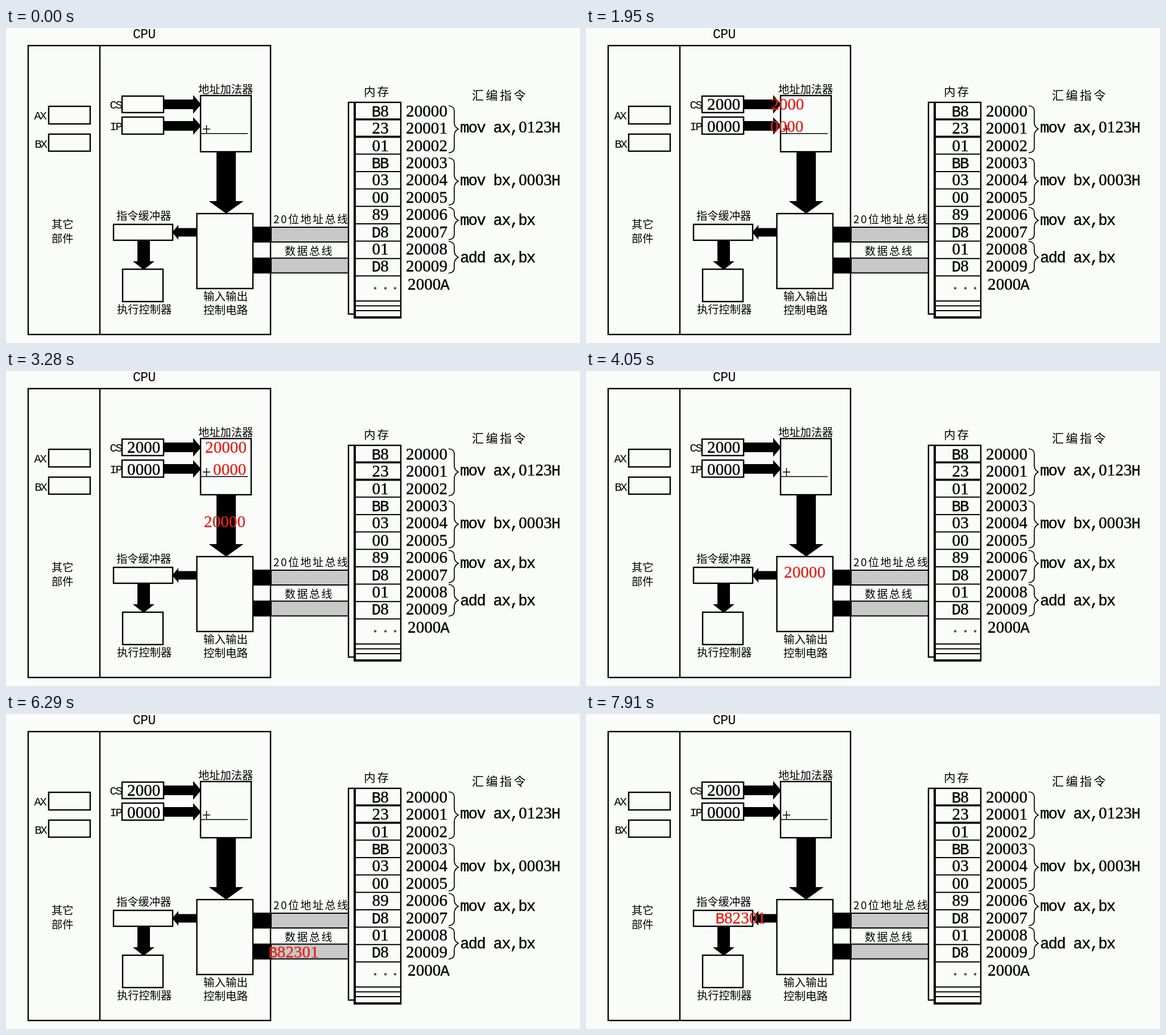
These frames come from a looping animation (1009x555 px, 7.99 s). An HTML page with a canvas:

```html
<!DOCTYPE html>
<html lang="zh">
<head>
<meta charset="utf-8">
<style>
html, body { margin: 0; width: 100%; height: 100%; overflow: hidden; background: #f9fcf9; }
canvas { display: block; }
</style>
</head>
<body>
<canvas id="stage" width="1009" height="555"></canvas>
<script>
const c = document.getElementById('stage').getContext('2d');
const LOOP = 7990, START = 1490, STEP = 77.33;
const PAPER = '#f9fcf9', INK = '#000', RED = '#e6231c', GREY = '#c8c8c8';
const CELL = 14.6;

function box(x1, y1, x2, y2, width = 2.4, fill) {
  if (fill) {
    c.fillStyle = fill;
    c.fillRect(x1, y1, x2 - x1, y2 - y1);
  }
  c.strokeStyle = INK;
  c.lineWidth = width;
  c.strokeRect(x1, y1, x2 - x1, y2 - y1);
}

function line(x1, y1, x2, y2, width = 2) {
  c.strokeStyle = INK;
  c.lineWidth = width;
  c.beginPath();
  c.moveTo(x1, y1);
  c.lineTo(x2, y2);
  c.stroke();
}

// Arrow from a tail point: length, shaft width, head length and width, direction.
function arrow(x, y, length, shaft, head, span, angle) {
  const s = shaft / 2, w = span / 2, neck = length - head;
  c.save();
  c.translate(x, y);
  c.rotate(angle);
  c.fillStyle = INK;
  c.beginPath();
  for (const [px, py] of [[0, -s], [neck, -s], [neck, -w], [length, 0], [neck, w], [neck, s], [0, s]]) c.lineTo(px, py);
  c.fill();
  c.restore();
}

// Code text on a fixed grid, centred vertically on y.
function code(text, x, y, color = INK) {
  c.fillStyle = c.strokeStyle = color;
  c.lineWidth = 0.4;
  c.textAlign = 'center';
  [...text].forEach((ch, i) => {
    c.font = /\d/.test(ch) ? '29px "Liberation Serif", serif' : '27px "Liberation Mono", monospace';
    const cx = x + (i + 0.5) * CELL;
    c.fillText(ch, cx, y + 8.7);
    c.strokeText(ch, cx, y + 8.7);
  });
}

function text(str, x, y, font, spacing) {
  c.fillStyle = INK;
  c.textAlign = 'left';
  c.font = font;
  c.letterSpacing = spacing + 'px';
  c.fillText(str, x, y);
  c.letterSpacing = '0px';
}

function label(str, x, y, size = 19.3, spacing = 0) {
  text(str, x, y + size * 0.36, size + 'px "Noto Sans CJK SC", "Noto Sans CJK", sans-serif', spacing);
}

function tag(str, x, y, size = 20.5, spacing = -2.2) {
  text(str, x, y + size * 0.32, size + 'px "Liberation Mono", monospace', spacing);
}

function brace(top, mid, bottom) {
  c.strokeStyle = INK;
  c.lineWidth = 1.7;
  c.beginPath();
  c.moveTo(778, top);
  c.quadraticCurveTo(788, top + 1, 788, top + 9);
  c.lineTo(788, mid - 11);
  c.quadraticCurveTo(788, mid - 4, 795, mid);
  c.quadraticCurveTo(788, mid + 4, 788, mid + 11);
  c.lineTo(788, bottom - 9);
  c.quadraticCurveTo(788, bottom - 1, 778, bottom);
  c.stroke();
}

function drawCpu() {
  tag('CPU', 223, 11, 23, -0.6);
  box(39, 31, 465, 540);
  line(165, 31, 165, 540, 2.4);
  tag('AX', 49.5, 154);
  tag('BX', 50.5, 204);
  box(75, 138, 148, 169);
  box(75, 187, 148, 217);
  label('其它', 80, 346);
  label('部件', 80, 371);

  tag('CS', 182.5, 135);
  tag('IP', 182.5, 173);
  box(204, 120, 277, 149);
  box(204, 157, 277, 187);
  arrow(277, 134.5, 66, 17, 14, 33, 0);
  arrow(277, 172.5, 66, 17, 14, 31, 0);

  label('地址加法器', 338, 108);
  box(342, 119, 431, 218);
  line(342, 186, 425, 186, 1.4);
  line(346, 178, 359, 178, 1.5);
  line(352.5, 171, 352.5, 185, 1.5);
  arrow(387, 218, 109, 34, 22, 61, Math.PI / 2);

  box(335.5, 327, 434, 459);
  label('输入输出', 347, 473, 19.5);
  label('控制电路', 347, 497, 19.5);
  arrow(336, 360, 44, 15, 11, 26, Math.PI);
  label('指令缓冲器', 194, 331);
  box(189, 346, 293, 374);
  arrow(242, 374, 52, 22, 15, 38, Math.PI / 2);
  box(205, 425, 276, 482);
  label('执行控制器', 195, 496);
}

function drawBuses() {
  for (const y of [351, 405.5]) {
    box(466, y, 602, y + 26, 2, GREY);
    box(435, y, 465, y + 26, 2, INK);
  }
  label('20位地址总线', 470, 337, 19, 2.5);
  label('数据总线', 490, 393, 19, 2.5);
}

function drawMemory() {
  label('内存', 629, 113, 20.5, 3);
  label('汇编指令', 819, 118, 21, 3.5);
  box(602, 131, 613, 504);
  box(613, 131, 694, 510);
  line(613, 130, 613, 512, 4);
  line(611, 510, 695, 510, 4);
  for (const y of [481, 489.5, 498]) line(613, y, 694, y);
  ['B8', '23', '01', 'BB', '03', '00', '89', 'D8', '01', 'D8'].forEach((byte, i) => {
    const y = 147 + i * 30.4;
    code(byte, 643.5, y);
    code('2000' + i, 703, y);
    line(613, 161 + i * 30.65, 694, 161 + i * 30.65, i < 2 ? 3.6 : 2);
  });
  code('2000A', 706, 452);
  c.fillStyle = '#555';
  for (const x of [649, 667, 684]) {
    c.beginPath();
    c.arc(x, 458.5, 2.2, 0, 7);
    c.fill();
  }
  brace(137, 178, 220);
  brace(229, 270, 312);
  brace(316, 339, 373);
  brace(376, 404, 432);
  code('mov ax,0123H', 799, 175);
  code('mov bx,0003H', 799, 268);
  code('mov ax,bx', 799, 338);
  code('add ax,bx', 799, 404);
}

// Position on a path of [time, x, y] stops, linear between them.
function along(t, ...stops) {
  const last = stops[stops.length - 1];
  if (t <= stops[0][0]) return stops[0].slice(1);
  if (t >= last[0]) return last.slice(1);
  const i = stops.findIndex(s => s[0] > t);
  const [t0, x0, y0] = stops[i - 1], [t1, x1, y1] = stops[i];
  const k = (t - t0) / (t1 - t0);
  return [x0 + (x1 - x0) * k, y0 + (y1 - y0) * k];
}

function drawValues(t) {
  if (t < START) return;
  code('2000', 213, 135);
  code('0000', 213, 174);

  if (t < 3960) {
    const shifted = t >= 2170;
    code(shifted ? '20000' : '2000', ...along(t, [1490, 213, 135], [1954, 325, 135], [2060, 350, 135]), RED);
    code('0000', ...along(t, [1490, 213, 174], [1954, 324, 174], [2110, 364, 174]), RED);
  }
  if (t >= 2330 && t < 5430) {
    code('20000', ...along(t, [2770, 348, 205], [3280, 348, 268], [3970, 348, 355],
      [4050, 348, 355], [4970, 529, 365]), RED);
  }
  if (t >= 5430 && t < 6050) code('20000', 703, 147, RED);
  if (t >= 6050) {
    code('B82301', ...along(t, [6060, 508, 420], [6290, 461, 420], [6850, 348, 420],
      [6900, 348, 420], [7320, 348, 360], [7910, 228, 360], [7990, 212, 360]), RED);
  }
}

function frame(now) {
  const t = now % LOOP;
  const tick = Math.floor((t - START) / STEP + 0.15);
  c.fillStyle = PAPER;
  c.fillRect(0, 0, 1009, 555);
  drawCpu();
  drawBuses();
  drawMemory();
  drawValues(START + tick * STEP);
  requestAnimationFrame(frame);
}
requestAnimationFrame(frame);
</script>
</body>
</html>
```
